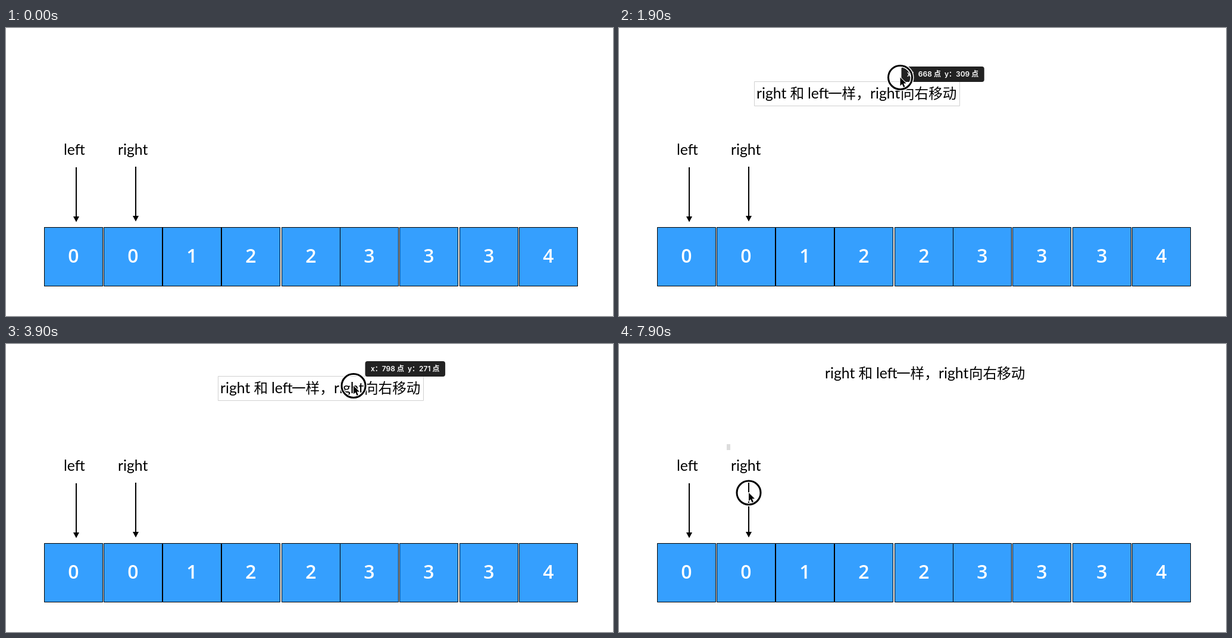
An HTML page with a canvas that plays this animation: 1020 px wide and 486 px high, repeating every 8 s.

```html
<!DOCTYPE html>
<html lang="zh-CN">
<head>
<meta charset="utf-8">
<title>Two pointers</title>
<style>
html, body { margin: 0; width: 100%; height: 100%; overflow: hidden; background: #fff; }
canvas { display: block; }
</style>
</head>
<body>
<canvas id="stage" width="1020" height="486"></canvas>
<script>
const ctx = document.getElementById('stage').getContext('2d');
const LOOP = 8000, STEP = 100;
const APPEAR = 900, SNAP = 4300, RELEASE = 5200, DESELECT = 5700, PRESS = 7800;

const LATIN = '24.8px Lato, sans-serif';
const HAN = '23.6px "Noto Sans CJK SC", "Noto Sans CJK", sans-serif';
const DIGIT = '600 32px "Open Sans", sans-serif';
const TIP = '600 12px Inter, "Noto Sans CJK SC", "Noto Sans CJK", sans-serif';

const VALUES = '001223334';
const TILE_LEFTS = [64, 164, 263, 362, 463, 561, 661, 762, 862];

// each leg: start time, end time, dx, dy
const boxPath = {
  x: 105, y: 468,
  legs: [
    [900, 2400, 165, 0], [962, 2130, 0, -420], [2450, 3100, 93, 13],
    [3600, 4400, -21, -23], [4700, 4850, 0, -9]
  ]
};
const mousePath = {
  x: 573, y: 50,
  legs: [[5300, 6100, -206, 121], [6200, 6500, -30, -105], [6600, 7200, -156, 103], [7800, 7900, 37, 82]]
};

function smooth(t, from, to) {
  const u = Math.min(1, Math.max(0, (t - from) / (to - from)));
  return u * u * (3 - 2 * u);
}

function along(path, t) {
  let { x, y } = path;
  for (const [from, to, dx, dy] of path.legs) {
    const k = smooth(t, from, to);
    x += dx * k;
    y += dy * k;
  }
  return { x, y };
}

function text(str, x, y, font, color = '#000', align = 'left') {
  ctx.font = font;
  ctx.fillStyle = color;
  ctx.textAlign = align;
  ctx.fillText(str, x, y);
}

function arrow(x, y) {
  ctx.fillStyle = '#000';
  ctx.fillRect(x - 1, y, 2, 85);
  ctx.beginPath();
  ctx.moveTo(x - 5, y + 83);
  ctx.lineTo(x + 5, y + 83);
  ctx.lineTo(x, y + 92.5);
  ctx.fill();
}

function drawScene() {
  ctx.fillStyle = '#fff';
  ctx.fillRect(0, 0, 1020, 486);
  ctx.lineWidth = 1;
  ctx.strokeStyle = '#000';
  TILE_LEFTS.forEach((left, i) => {
    ctx.fillStyle = '#359ffe';
    ctx.fillRect(left, 336, 99, 100);
    ctx.strokeRect(left + 0.5, 336.5, 98, 99);
    text(VALUES[i], left + 49.3, 396, DIGIT, '#fff', 'center');
  });
  text('left', 97, 214, LATIN);
  text('right', 188, 213.5, LATIN);
  arrow(118, 235);
  arrow(218, 234);
}

function drawCaption(x, y, framed) {
  const base = y + 29;
  text('right', x + 4, base, LATIN);
  text('和', x + 60.5, base, HAN);
  text('left', x + 90, base, LATIN);
  text('一样，', x + 124, base, HAN);
  text('right', x + 195, base, LATIN);
  text('向右移动', x + 246, base, HAN);
  if (framed) {
    ctx.lineWidth = 1;
    ctx.strokeStyle = '#d0d0d0';
    ctx.strokeRect(x + 0.5, y + 0.5, 345, 41);
  }
}

function drawTip(x, y, px, py) {
  const label = `x：${px} 点  y：${py} 点`;
  ctx.font = TIP;
  ctx.fillStyle = '#222';
  ctx.beginPath();
  ctx.roundRect(x, y, ctx.measureText(label).width + 19, 26, 4);
  ctx.fill();
  text(label, x + 9.5, y + 17.3, TIP, '#fff');
}

function drawRing(x, y) {
  for (const [color, width] of [['#fff', 6], ['#000', 3]]) {
    ctx.strokeStyle = color;
    ctx.lineWidth = width;
    ctx.beginPath();
    ctx.arc(x, y, 20, 0, Math.PI * 2);
    ctx.stroke();
  }
}

function drawMouse(x, y) {
  const shape = [[0, 0], [0, 14], [3.2, 11], [5.6, 16.5], [8, 15.5], [5.6, 10], [10, 10]];
  ctx.beginPath();
  for (const [dx, dy] of shape) ctx.lineTo(x + dx, y + dy);
  ctx.closePath();
  ctx.lineJoin = 'round';
  ctx.lineWidth = 2;
  ctx.strokeStyle = '#fff';
  ctx.stroke();
  ctx.fillStyle = '#000';
  ctx.fill();
}

// the dragged box trails the pointer by one step
function pointer(t) {
  if (t >= RELEASE) return along(mousePath, t);
  const next = along(boxPath, t + STEP);
  return { x: next.x + 231.5, y: next.y + 21 };
}

function draw(t) {
  drawScene();
  if (t < APPEAR) return;

  const dragging = t < RELEASE;
  const box = along(boxPath, t);
  const x = Math.round(box.x), y = Math.round(box.y);
  drawCaption(x, y, t < DESELECT);

  if (t >= SNAP && dragging) {
    ctx.fillStyle = '#ecc400';
    ctx.fillRect(514, 0, 1.4, 486);
  }
  if (dragging) {
    drawTip(x + 247.5, y - 25, Math.floor(box.x * 1.008 + 439), Math.floor(box.y * 1.02 + 217));
  }
  if (t > PRESS) {
    ctx.fillStyle = '#dcdcdc';
    ctx.fillRect(181, 169, 6, 10);
  }

  const mouse = pointer(t);
  if (dragging || t >= PRESS) drawRing(mouse.x, mouse.y);
  drawMouse(mouse.x, mouse.y);
}

const start = performance.now();
function tick() {
  const t = (performance.now() - start) % LOOP;
  draw(Math.floor(t / STEP) * STEP);
  requestAnimationFrame(tick);
}
tick();
</script>
</body>
</html>
```
